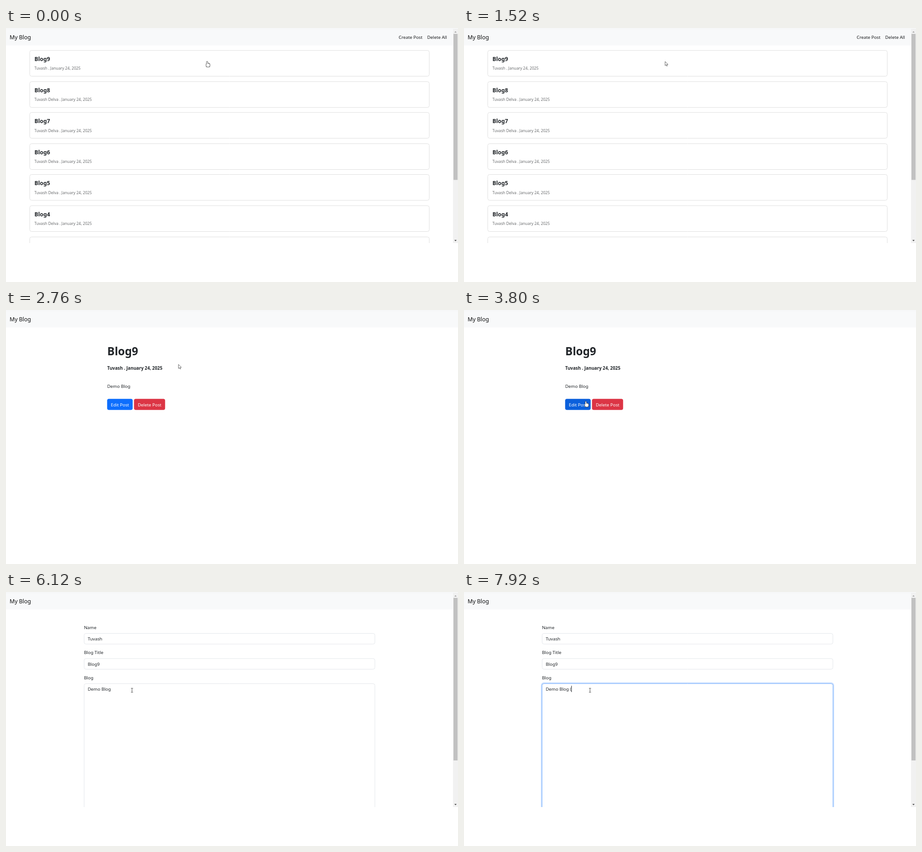
An HTML page with a canvas that plays this animation: 998x561 px, repeating every 8000 ms.

```html
<!DOCTYPE html>
<html lang="en">
<head>
<meta charset="utf-8">
<title>My Blog</title>
<style>
  html, body { margin: 0; width: 100%; height: 100%; overflow: hidden; background: #fff; }
  canvas { display: block; }
</style>
</head>
<body>
<canvas id="stage" width="998" height="561"></canvas>
<script>
const ctx = document.getElementById('stage').getContext('2d');
const LOOP = 8000, VIEW_H = 475, INK = '#212529', BODY = 9.75;
const AUTHOR = 'Tuvash', FULL = 'Tuvash Delva', DATE = 'January 24, 2025';

// Moments of the story, in ms
const T = { release: 1400, post: 1600, glide: 2400, hover: 3320, press: 4480,
            form: 4920, beam: 5200, nudge: 5860, focus: 6400, blink: 6960,
            space: 7240, paren: 7600 };

// Places where the pointer rests
const CARD = [444, 74], BUTTON = [269, 202], AREA = [276.5, 212];

const ramp = (t, start, span) => Math.max(0, Math.min(1, (t - start) / span));
const lerp = (a, b, k) => a.map((v, i) => v + (b[i] - v) * k);

function pointerAt(t) {
  return t < T.nudge ? lerp(CARD, BUTTON, ramp(t, T.glide, 1000))
                     : lerp(BUTTON, AREA, ramp(t, T.nudge, 220));
}

function text(str, x, y, size = BODY, color = INK, weight = 400) {
  ctx.font = `${weight} ${size}px "Noto Sans", "Open Sans", sans-serif`;
  ctx.fillStyle = color;
  ctx.fillText(str, x, y);
  return ctx.measureText(str).width;
}

function rect(x, y, w, h, color) {
  ctx.fillStyle = color;
  ctx.fillRect(x, y, w, h);
}

function paint(fill, stroke, line = 1) {
  if (fill) { ctx.fillStyle = fill; ctx.fill(); }
  if (stroke) { ctx.strokeStyle = stroke; ctx.lineWidth = line; ctx.stroke(); }
}

function box(x, y, w, h, r, fill, stroke, line) {
  ctx.beginPath();
  ctx.roundRect(x, y, w, h, r);
  paint(fill, stroke, line);
}

function poly(points, fill, stroke, line) {
  ctx.beginPath();
  points.forEach(([x, y]) => ctx.lineTo(x, y));
  ctx.closePath();
  paint(fill, stroke, line);
}

function navbar() {
  rect(0, 1, 998, 37.5, '#f8f9fa');
  rect(0, 1, 998, 1, '#eeeff0');
  text('My Blog', 8, 25.3, 12.4, '#0f1011');
}

function scrollArrow(y, dir, color) {
  poly([[990, y - dir], [992.5, y + 2 * dir], [995, y - dir]], color);
}

function scrollbar(bottom) {
  rect(987, 2, 11, VIEW_H - 2, '#f1f1f1');
  rect(988, 13, 9, bottom - 13, '#c1c1c1');
  scrollArrow(9, -1, '#a3a3a3');
  scrollArrow(469, 1, '#505050');
}

function listPage() {
  scrollbar(335.5);
  text('Create Post', 867, 24.4, BODY, '#17191b');
  text('Delete All', 930, 24.4, BODY, '#17191b');
  for (let i = 0; i < 7; i++) {
    const y = 49 + i * 68.6;
    box(52.5, Math.round(y) + 0.5, 882, 57, 4, '#fff', '#dfdfdf');
    text('Blog' + (9 - i), 62.8, y + 24, 12.3, INK, 600);
    text(`${i ? FULL : AUTHOR} . ${DATE}`, 62.8, y + 43.4, 8.6, '#6a6c6e');
  }
}

function button(label, x, w, fill) {
  box(x, 196.2, w, 24.6, 4, fill);
  text(label, x + 8.3, 212.8, BODY, '#fff');
}

function postPage(t) {
  text('Blog9', 223.5, 100.4, 24.4, INK, 600);
  text(`${AUTHOR} . ${DATE}`, 223.5, 132, 9.8, INK, 600);
  text('Demo Blog', 223.5, 172);
  const shade = 1 - 0.13 * ramp(t, T.hover, 150) - 0.06 * ramp(t, T.press, 150);
  button('Edit Post', 223.3, 56.4, `rgb(${[13, 110, 253].map(v => v * shade)})`);
  button('Delete Post', 282.6, 68.7, '#dc3545');
}

function field(label, value, y, h) {
  text(label, 172.2, y - 9.3);
  box(172.5, y + 0.5, 642, h, 4, '#fff', '#e3e6ea');
  return text(value, 180.5, y + 16.2);
}

function formPage(t) {
  scrollbar(372);
  field('Name', AUTHOR, 91, 23.5);
  field('Blog Title', 'Blog9', 146.5, 23.5);
  const value = 'Demo Blog' + (t >= T.space ? ' ' : '') + (t >= T.paren ? '(' : '');
  const w = field('Blog', value, 202, 330);
  if (t < T.focus) return;
  ctx.globalAlpha = ramp(t, T.focus, 150);
  box(171, 201, 645, 333, 5.5, null, '#c2dbfe', 2.4);
  box(172.5, 202.5, 642, 330, 4, null, '#86b7fe');
  ctx.globalAlpha = 1;
  if (t < T.blink || t >= T.space) rect(Math.round(181 + w), 207, 1, 14, INK);
}

function arrow() {
  poly([[0, 0], [0, 9], [2.1, 7.2], [3.6, 10.2], [5, 9.5], [3.6, 6.7], [6.4, 6.5]],
       '#fff', '#3a3a3a', 0.8);
}

// Finger and palm: outline both, then fill so they merge
function hand() {
  ctx.beginPath();
  ctx.roundRect(-0.9, 0, 1.9, 8, 0.9);
  ctx.roundRect(-1.8, 4.4, 7.6, 7.4, 2.4);
  paint(null, '#333', 1.6);
  paint('#fff');
}

function beam() {
  rect(1.2, 0.5, 1, 9, '#444');
  for (const y of [0, 9.1]) rect(-0.6, y, 4.6, 0.9, '#555');
}

function pointer(t) {
  const pointing = t < T.release || (t >= T.hover && t < T.press);
  ctx.save();
  ctx.translate(...pointerAt(t));
  ctx.lineJoin = 'round';
  (t >= T.beam ? beam : pointing ? hand : arrow)();
  ctx.restore();
}

function draw() {
  const t = performance.now() % LOOP;
  rect(0, 0, 998, 561, '#fff');
  ctx.save();
  ctx.beginPath();
  ctx.rect(0, 0, 998, VIEW_H);
  ctx.clip();
  navbar();
  (t < T.post ? listPage : t < T.form ? postPage : formPage)(t);
  pointer(t);
  ctx.restore();
  requestAnimationFrame(draw);
}
draw();
</script>
</body>
</html>
```
